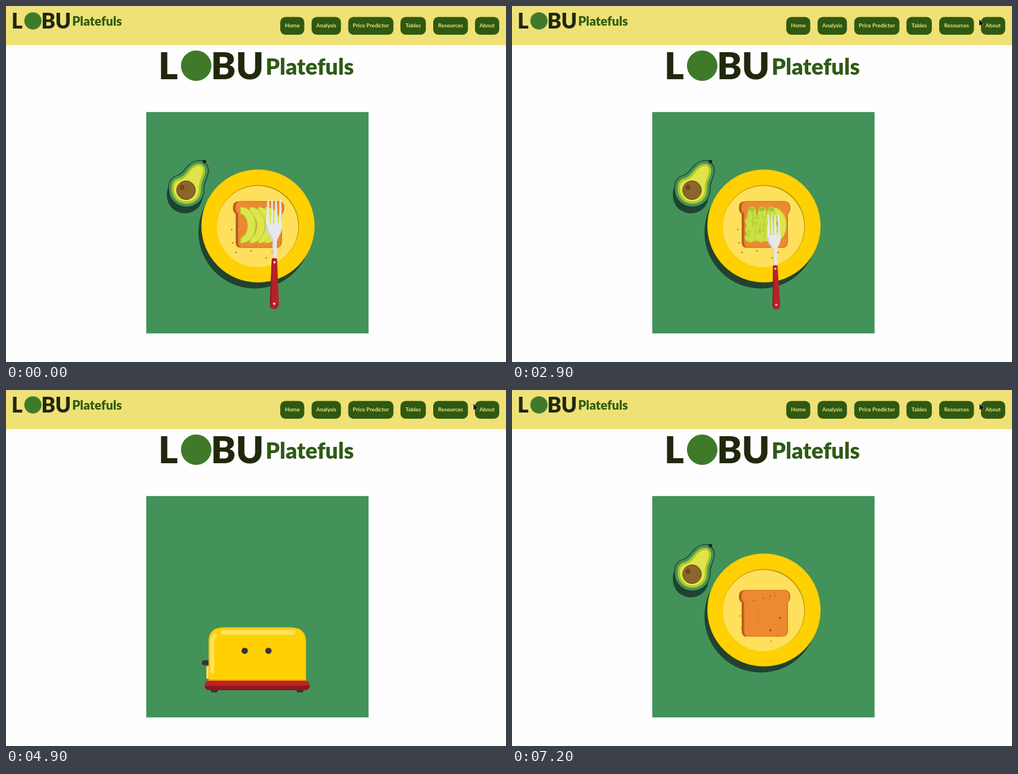
Animation of 886 by 632 pixels, one loop 7.3 s. Source, as an HTML page:

```html
<!DOCTYPE html>
<html lang="en">
<head>
<meta charset="utf-8">
<title>Avocado toast</title>
<style>
html, body { margin: 0; width: 100%; height: 100%; overflow: hidden; background: #fefefe; }
svg { display: block; font-family: Lato, "Open Sans", sans-serif; }
.nav rect { fill: #2f5911; }
.nav text { fill: #f0e279; font-size: 9.7px; font-weight: 700; text-anchor: middle; }

.plate, .toaster, .body, .lever, .eyes, .pop, .crumb, .toast, .crumbs, .top, .fork, .cursor {
  animation: 7300ms linear infinite;
}
.plate { animation-name: plate; animation-timing-function: step-end; }
.toaster { animation-name: toaster; animation-timing-function: step-end; }
.top { animation-name: mash; animation-timing-function: step-end; }
.slice { opacity: clamp(0, calc(var(--i) + 1 - var(--n)), 1); }
.mash { opacity: clamp(0, calc(var(--n) - var(--i)), 1); }
.body { animation-name: jiggle; }
.lever { animation-name: lever; }
.eyes { animation-name: eyes; transform-origin: 444px 463px; }
.pop { animation-name: pop; }
.crumb { animation-name: crumb; }
.toast { animation-name: land; }
.crumbs { animation-name: scatter; transform-origin: 446px 435px; }
.fork { animation-name: fork; animation-timing-function: ease-in-out; }
.cursor { animation-name: cursor; animation-timing-function: ease-out; }

@keyframes plate { 0% { opacity: 1 } 60.3% { opacity: 0 } 91.8%, 100% { opacity: 1 } }
@keyframes toaster { 0% { opacity: 0 } 60.3% { opacity: 1 } 91.8%, 100% { opacity: 0 } }
@keyframes mash {
  0% { --n: 0; opacity: 1 } 15% { --n: 1; opacity: 1 } 24.5% { --n: 2; opacity: 1 }
  36.5% { --n: 3; opacity: 1 } 46.6% { --n: 4; opacity: 1 } 60.3%, 100% { --n: 4; opacity: 0 }
}
@keyframes fork {
  0% { transform: translate(475px, 344px) rotate(0deg) scale(1, 1) }
  5.5% { transform: translate(451px, 342px) rotate(1deg) scale(.97, 1) }
  9.6% { transform: translate(427px, 353px) rotate(3deg) scale(.9, .95) }
  12.3% { transform: translate(426px, 368px) rotate(3deg) scale(.86, .85) }
  15% { transform: translate(426px, 353px) rotate(3deg) scale(.87, .94) }
  17.8% { transform: translate(427px, 368px) rotate(3deg) scale(.86, .85) }
  20.5% { transform: translate(436px, 353px) rotate(3deg) scale(.87, .94) }
  23.288% { transform: translate(442.5px, 355.3px) rotate(3deg) scale(.86, .925) }
  26% { transform: translate(444px, 368px) rotate(2deg) scale(.86, .85) }
  28.8% { transform: translate(444px, 353px) rotate(1deg) scale(.87, .94) }
  31.5% { transform: translate(446px, 368px) rotate(.5deg) scale(.86, .85) }
  35.6% { transform: translate(458px, 354px) rotate(-.8deg) scale(.86, .94) }
  39.726% { transform: translate(463px, 370px) rotate(-1.8deg) scale(.84, .87) }
  43% { transform: translate(466px, 354px) rotate(-2.2deg) scale(.86, .94) }
  46% { transform: translate(474px, 368px) rotate(-3deg) scale(.86, .85) }
  48.4% { transform: translate(475px, 354px) rotate(-3.2deg) scale(.87, .93) }
  50.685% { transform: translate(475.2px, 368px) rotate(-3.6deg) scale(.86, .83) }
  54% { transform: translate(477px, 348px) rotate(-2deg) scale(.95, .97) }
  58.9%, 100% { transform: translate(478px, 600px) rotate(0deg) scale(1, 1) }
}
@keyframes jiggle {
  0%, 60.3%, 67.1%, 74%, 81%, 84.5% { transform: none }
  63.7%, 70.5%, 77.5% { transform: translateY(-1px) }
  86.5% { transform: translateY(-3px) }
  89.04% { transform: translateY(-1.5px) }
  91.8%, 100% { transform: none }
}
@keyframes lever {
  0%, 84.9% { transform: none }
  86.5% { transform: translateY(-29px) }
  88%, 100% { transform: translateY(-26.5px) }
}
@keyframes eyes {
  0%, 84.9% { transform: none }
  87% { transform: scaleY(1.25) }
  89.04% { transform: scaleY(1.13) }
  91.8%, 100% { transform: none }
}
@keyframes pop {
  0%, 84.9% { transform: translateY(85px) }
  88.5%, 100% { transform: translateY(-260px) }
}
@keyframes crumb {
  0%, 86.2% { transform: translate(486px, 428px) }
  87.7% { transform: translate(490px, 400px) }
  89.04% { transform: translate(491px, 411px) }
  90.4%, 100% { transform: translate(492px, 435px) }
}
@keyframes land {
  0%, 91.8% { transform: none }
  91.81% { transform: translateY(-260px) }
  96.6% { transform: translateY(14px) }
  98.63% { transform: translateY(8.5px) }
  100% { transform: translateY(5px) }
}
@keyframes scatter {
  0%, 91.8% { transform: none }
  91.81%, 96.2% { transform: scale(.3) }
  98.63% { transform: scale(.89) }
  100% { transform: none }
}
@keyframes cursor {
  0%, 12.3% { transform: translate(892px, -16px) }
  21.9%, 41% { transform: translate(828px, 24px) }
  50%, 100% { transform: translate(828.5px, 24.5px) }
}
</style>
</head>
<body>
<svg width="886" height="632" viewBox="0 0 886 632">
  <defs>
    <clipPath id="frame"><rect x="248.5" y="188.2" width="394" height="393"/></clipPath>
    <path id="pear" d="M337 275C352 271 361 284 358 298C355 310 351 313 351 324C352 344 338 357 319 357C301 356 288 343 288 324C288 309 295 303 303 301C317 297 319 279 337 275Z"/>
    <clipPath id="pearClip"><use href="#pear"/></clipPath>
    <path id="bread" d="M412 347H483Q493 347 493 358Q493 366 488.500 369V420Q488 429 479 429H416Q407 429 407 420V369Q402 366 402 358Q402 347 412 347Z"/>
    <g id="slab">
      <use href="#bread" fill="#b4601f"/>
      <use href="#bread" fill="#ed8931" stroke="#bb6722" transform="translate(26 .6) scale(.946 .998)"/>
      <g id="specks"></g>
    </g>
    <g id="brand" font-weight="900">
      <g font-size="66" fill="#20280e">
        <text x="270" y="130">L</text>
        <text x="363" y="130">BU</text>
      </g>
      <circle cx="337" cy="106" r="27" fill="#3f7a2b"/>
      <text x="460" y="121.500" font-size="39.500" fill="#2e5b15">Platefuls</text>
    </g>
  </defs>

  <rect width="886" height="69.500" fill="#efe175"/>
  <rect width="886" height="1" fill="#d9d2a4"/>
  <use href="#brand" transform="translate(-142.700 -33.500) scale(.565)"/>
  <g class="nav" id="nav"></g>
  <use href="#brand"/>

  <g clip-path="url(#frame)">
    <rect x="248" y="188" width="396" height="394" fill="#43925a"/>

    <g class="plate">
      <use href="#pear" fill="#20432e" transform="translate(-3 11)"/>
      <g clip-path="url(#pearClip)" fill="none">
        <use href="#pear" fill="#e0e34b"/>
        <use href="#pear" stroke="#a9c822" stroke-width="19"/>
        <use href="#pear" stroke="#43925a" stroke-width="11"/>
      </g>
      <use href="#pear" fill="none" stroke="#1d2d2c" stroke-width="1.2"/>
      <path d="M348 274l5-1 2 3-2 4-4-2z" fill="#15201c"/>
      <circle cx="319" cy="327" r="16.500" fill="#8b662a" stroke="#563a17"/>
      <circle cx="312" cy="322" r="4.500" fill="#7b4220"/>

      <circle cx="441" cy="401.500" r="100" fill="#20432e"/>
      <circle cx="446.500" cy="390.500" r="100.300" fill="#ffd002"/>
      <circle cx="446.500" cy="390.500" r="72.700" fill="#b39106"/>
      <circle cx="445.800" cy="391.500" r="72.200" fill="#ffe05c"/>
      <g class="crumbs" id="crumbs" fill="#a9741d"></g>
      <use class="toast" href="#slab"/>
      <g class="top" id="top"></g>

      <g class="fork">
        <path d="M-12 1Q-10.500-1-9 1L-7.500 42H-5.500L-4.800 1Q-3.500-1-2.200 1L-1.500 42H.5L2.200 1Q3.500-1 4.800 1L6.500 42H8.500L9.500 1Q11-1 12.500 1L14 45C15 60 6 66 5 74L4.500 106H-2.500L-3 74C-4 66-15 60-14.500 45Z" fill="#e8e8e8"/>
        <path d="M-14.500 45C-15 60-4 66-3 74L-2.500 106H-.5V74C-2 64-11 60-11 46Z" fill="#d2d3d5"/>
        <path d="M-4 106Q-4 103.500 1 103.500Q5.500 103.500 5.500 106L8.500 184Q8.500 194 .5 194Q-7.500 194-7.500 184Z" fill="#b72126"/>
        <path d="M-4 106Q-4 104-2.500 104L-5 184Q-5 191-2 193.500Q-7.500 192-7.500 184Z" fill="#96181c"/>
        <circle cx=".8" cy="111" r="2" fill="#f6e9e6"/>
        <circle cx=".3" cy="184.500" r="2" fill="#f6e9e6"/>
      </g>
    </g>

    <g class="toaster">
      <use class="pop" href="#slab"/>
      <circle class="crumb" r="1" fill="#4a3a20"/>
      <g class="body">
        <rect class="lever" x="347" y="480" width="18" height="8.500" rx="4" fill="#383436"/>
        <rect x="355" y="490" width="9" height="23" rx="3" fill="#ffe15d"/>
        <path d="M363 532h12v2q0 3-3 3h-6q-3 0-3-3zM515 532h12v2q0 3-3 3h-6q-3 0-3-3z" fill="#383436"/>
        <path d="M359 517V447Q359 421.500 385 421.500H505Q531.500 421.500 531.500 447V517Z" fill="#ffd002"/>
        <path d="M359.500 517V447Q359.500 422 385 422H505Q531 422 531 447V517" fill="none" stroke="#f1bd08"/>
        <path d="M359 514.500H531.500" stroke="#dca90c" stroke-width="1.500"/>
        <rect x="381" y="426" width="132" height="8.500" rx="4.200" fill="#ffe15d"/>
        <path d="M365.500 500V448Q365.500 440 371 435.500" fill="none" stroke="#ffe15d" stroke-width="7" stroke-linecap="round"/>
        <g class="eyes" fill="#383236">
          <circle cx="423" cy="463" r="5.600"/>
          <circle cx="465" cy="463" r="5.600"/>
        </g>
        <rect x="352" y="516" width="186.500" height="17" rx="8.500" fill="#c41f24"/>
        <path d="M352 525H538.500Q537.500 533 530 533H360.500Q353 533 352 525Z" fill="#8f161b"/>
      </g>
    </g>
  </g>

  <path class="cursor" d="M0 0V11L2.500 8.800L4.300 12.500L6.200 11.600L4.500 8H7.800Z" fill="#111" stroke="#ddd" stroke-width=".8" paint-order="stroke"/>
</svg>

<script>
const $ = id => document.getElementById(id);

function add(parent, tag, attrs, text) {
  const el = document.createElementNS("http://www.w3.org/2000/svg", tag);
  for (const k in attrs) el.setAttribute(k, attrs[k]);
  if (text) el.textContent = text;
  parent.appendChild(el);
  return el;
}

let seed = 7;
const rnd = (a, b) => {
  seed = seed * 16807 % 2147483647;
  return a + (b - a) * seed / 2147483647;
};

const links = [["Home", 486, 528.5], ["Analysis", 541.5, 593.5], ["Price Predictor", 606.5, 686.5],
  ["Tables", 699, 744], ["Resources", 757, 818.5], ["About", 831, 874]];
for (const [label, l, r] of links) {
  add($("nav"), "rect", { x: l, y: 19.5, width: r - l, height: 31.5, rx: 9 });
  add($("nav"), "text", { x: (l + r) / 2, y: 38 }, label);
}

const dot = (parent, [x, y, r], fill) => add(parent, "circle", { cx: x, cy: y, r, fill });
for (let i = 0; i < 34; i++)
  dot($("specks"), [rnd(414, 484), rnd(354, 423), rnd(.4, .9)], i % 3 ? "#bd671f" : "#f7ab5c");
for (const p of [[475, 396, 1.8], [458, 418, 1.9], [457, 358, 1.2], [466, 357, 1], [445, 361, 1.1], [428, 365, 1.1]])
  dot($("specks"), p, "#9a501a");
for (const [x, y] of [[400, 397], [402, 420.5], [408, 437.5], [434, 435], [461, 447], [472, 437.5]])
  add($("crumbs"), "circle", { cx: x, cy: y, r: 1.3 });

// Toppings: crescents stacked right to left, then the mashed columns over them.
const topping = $("top");
const crescent = "M0 357C36 357 36 421 0 421L1 412C17 404 17 374 0 368Z";
[415.5, 432, 447, 459].map((x, i) => [x, i]).reverse().forEach(([x, i]) => {
  const g = add(topping, "g", { class: "slice", style: `--i:${i}`, transform: `translate(${x} 0)` });
  add(g, "path", { d: crescent, fill: "#a8bd28", transform: "translate(-.5 1)" });
  add(g, "path", { d: crescent, fill: "#dce64c", stroke: "#b9cb35", "stroke-width": 1.2 });
});
const blob = "M-6 361Q-4 356 0 356Q5 356 7 361L8 371L12 378L9 386L12 394L9 401L12 412" +
  "Q8 419 3 417Q-1 422-6 418Q-11 418-13 411L-9 404L-12 397L-9 389L-13 381L-9 375Z";
[425, 443, 459, 475].forEach((x, i) => {
  const g = add(topping, "g", { class: "mash", style: `--i:${i}`, transform: `translate(${x} 0)` });
  add(g, "path", { d: blob, fill: "#cbe044", stroke: "#b0cc36", "stroke-width": .7, "stroke-linejoin": "round" });
  add(g, "ellipse", { cx: 0, cy: 361, rx: 5.5, ry: 4, fill: "#a2c835" });
  let d = "";
  for (let k = 0; k < 15; k++)
    d += `M${rnd(-8, 8)} ${rnd(365, 408)}q${rnd(-4, 4)} 3 ${rnd(-5, 5)} ${rnd(5, 8)}`;
  add(g, "path", { d, fill: "none", stroke: "#a3c434", "stroke-width": 1.1, "stroke-linecap": "round" });
});
</script>
</body>
</html>
```
